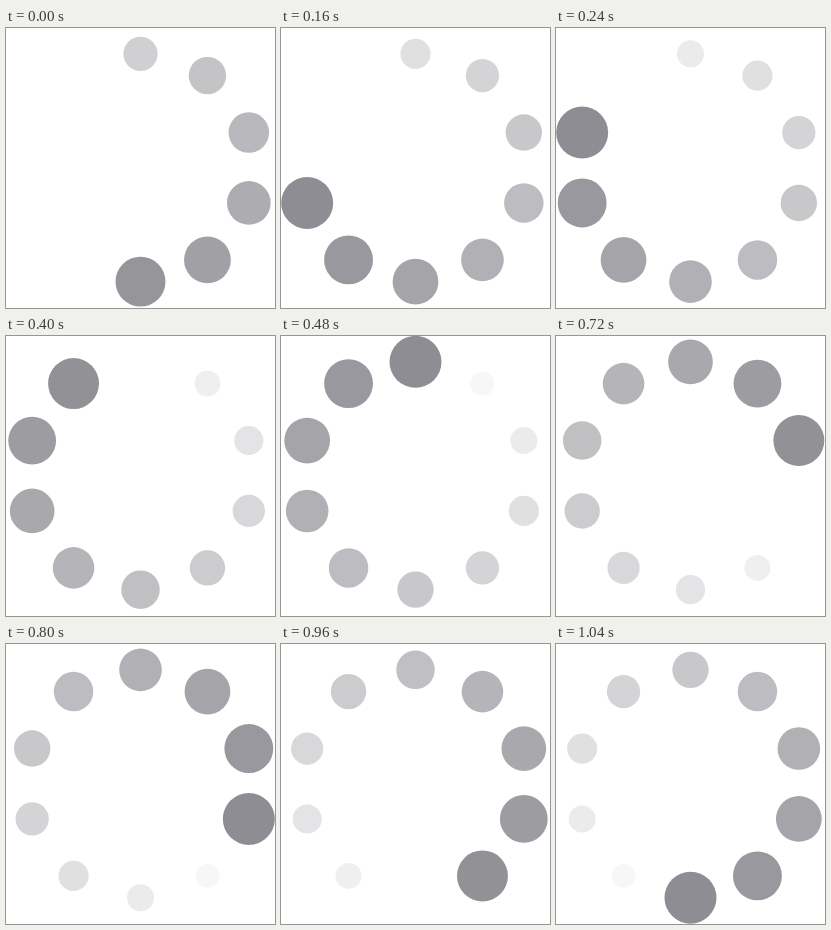
Animation of 269 by 280 pixels, one loop 1.12 s. Source, as an HTML page with a canvas:

```html
<!DOCTYPE html>
<html lang="en">
<head>
<meta charset="utf-8">
<title>Loading spinner</title>
<style>
  html, body { margin: 0; width: 100%; height: 100%; overflow: hidden; background: #fff; }
  canvas { display: block; }
</style>
</head>
<body>
<canvas width="269" height="280"></canvas>
<script>
const ctx = document.querySelector('canvas').getContext('2d');
const TICK = 80, TICKS = 14;
const CX = 134.5, CY = 139.75, RING = 113.9, DOTS = 10;
const GAP = 3, LIFE = 28; // steps between births, steps a dot stays visible

// Two steps per tick, with one extra step at ticks 3 and 7.
const stepAt = tick => 17 + 2 * tick + (tick >= 3) + (tick >= 7);

function drawDot(k, age) {
  const angle = k * 2 * Math.PI / DOTS;
  ctx.globalAlpha = 1 - age / 29;
  ctx.beginPath();
  ctx.arc(CX + RING * Math.sin(angle), CY - RING * Math.cos(angle),
          26 - 0.52 * age, 0, 2 * Math.PI);
  ctx.fill();
}

function draw(now) {
  const step = stepAt(Math.floor(now / TICK) % TICKS);
  ctx.clearRect(0, 0, 269, 280);
  ctx.fillStyle = '#8e8d93';
  for (let k = 0; k * GAP <= step; k++) {
    const age = step - k * GAP;
    if (age < LIFE) drawDot(k, age);
  }
}

const start = performance.now();
function loop() {
  draw(performance.now() - start);
  requestAnimationFrame(loop);
}
loop();
</script>
</body>
</html>
```
